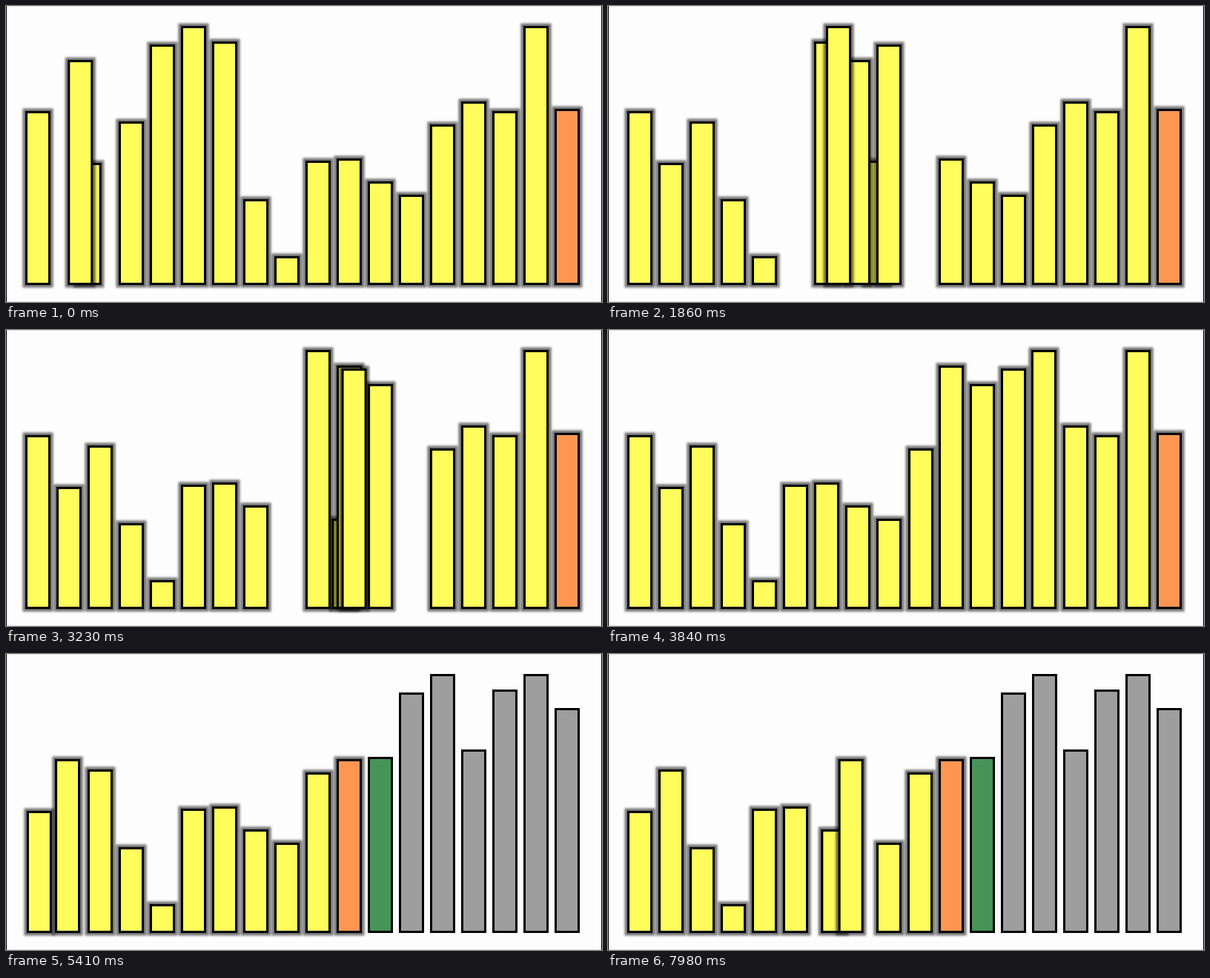
These frames come from a looping animation (804 by 400 pixels, 8000 ms). An HTML page:

```html
<!DOCTYPE html>
<html lang="en">
<head>
<meta charset="utf-8">
<title>Quicksort bars</title>
<style>
  html, body { margin: 0; width: 100%; height: 100%; overflow: hidden; background: #fdfdfd; }
  svg { display: block; width: 804px; height: 400px; }
</style>
</head>
<body>
<svg id="stage" viewBox="0 0 804 400">
  <defs>
    <filter id="soft" x="-30" y="-30" width="864" height="460" filterUnits="userSpaceOnUse">
      <feGaussianBlur stdDeviation="1.5"/>
    </filter>
  </defs>
  <rect width="804" height="400" fill="#fdfdfd"/>
  <rect width="804" height="1" fill="#e0e0e0"/>
  <rect y="399" width="804" height="1" fill="#e0e0e0"/>
  <rect width="1" height="400"/>
  <rect x="803" width="1" height="400"/>
</svg>
<script>
const LOOP = 8000, BEGIN = -234;
const MOVE = 400, SWAP = 440, COMPARE = 35, PAUSE = 145;
const STEP = 42, LEFT = 27.5, WIDTH = 31, BASE = 375.5, GLOW = 5;
const YELLOW = '#fffd5c', ORANGE = '#fd9650', GREEN = '#479358', GREY = '#9e9e9e';

// Top edge of each bar, in starting order; a lower top is a larger value.
const tops = [142, 73, 212, 156, 52, 27, 48, 261, 338, 209, 206, 237, 255, 160, 129, 142, 27, 139];

const swaps = [];
const work = tops.slice();
let clock = BEGIN;

function swap(list, a, b) {
  [list[a], list[b]] = [list[b], list[a]];
}

function plan(a, b) {
  if (a === b) {
    clock += COMPARE;
    return;
  }
  swaps.push({ start: clock, a, b });
  swap(work, a, b);
  clock += SWAP;
}

function partition(lo, hi) {
  let edge = lo;
  for (let j = lo; j < hi; j++) {
    if (work[j] > work[hi]) plan(edge++, j);
    else clock += COMPARE;
  }
  plan(edge, hi);
  clock += COMPARE;
  return edge;
}

const last = tops.length - 1;
const mid = partition(0, last);
const split = clock;
clock += PAUSE;
partition(0, mid - 1);

const stage = document.getElementById('stage');

function set(el, attrs) {
  for (const key in attrs) el.setAttribute(key, attrs[key]);
}

function addRect(attrs) {
  const el = document.createElementNS('http://www.w3.org/2000/svg', 'rect');
  set(el, attrs);
  return stage.appendChild(el);
}

const slots = tops.map(() => ({
  glow: addRect({ opacity: 0.55, filter: 'url(#soft)' }),
  bar: addRect({ stroke: '#000', 'stroke-width': 3 })
}));

const ease = p => (1 - Math.cos(Math.PI * p)) / 2;

function colour(slot, id, t) {
  if (t < split) return id === last ? ORANGE : YELLOW;
  if (slot > mid) return GREY;
  if (slot === mid) return GREEN;
  return slot === mid - 1 ? ORANGE : YELLOW;
}

function draw(t) {
  const order = tops.map((_, i) => i);
  const place = order.slice();
  for (const { start, a, b } of swaps) {
    if (t < start) break;
    swap(order, a, b);
    const shift = (b - a) * ease(Math.min(1, (t - start) / MOVE));
    place[a] = b - shift;
    place[b] = a + shift;
  }
  slots.forEach(({ glow, bar }, i) => {
    const id = order[i];
    const x = LEFT + STEP * place[i], y = tops[id] + 1.5, height = BASE - y;
    set(bar, { x, y, width: WIDTH, height, fill: colour(i, id, t) });
    set(glow, {
      x: x - GLOW, y: y - GLOW, width: WIDTH + 2 * GLOW, height: height + 2 * GLOW,
      visibility: t < split || i < mid ? 'visible' : 'hidden'
    });
  });
}

const begin = performance.now();
function tick() {
  draw((performance.now() - begin) % LOOP);
  requestAnimationFrame(tick);
}
tick();
</script>
</body>
</html>
```
